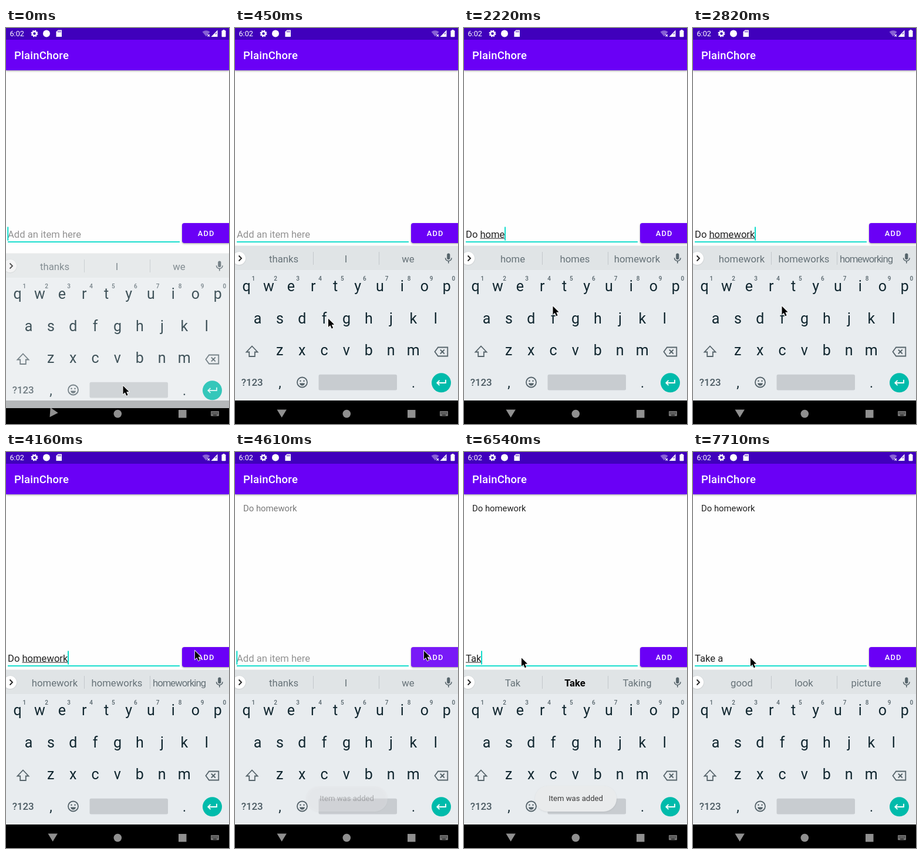
Write an HTML page with a canvas that moves like this. It is 380x674 px and loops after 8 s.

```html
<!DOCTYPE html>
<html lang="en">
<head>
<meta charset="utf-8">
<title>To-do list</title>
<style>
  html, body { margin: 0; width: 100%; height: 100%; overflow: hidden; background: #fefefe; }
  canvas { display: block; width: 380px; height: 674px; }
</style>
</head>
<body>
<canvas id="stage"></canvas>
<script>
const W = 380, H = 674, LOOP = 8000, TICK = LOOP / 54;
const canvas = document.getElementById('stage');
const ctx = canvas.getContext('2d');
const dpr = window.devicePixelRatio || 1;
canvas.width = W * dpr;
canvas.height = H * dpr;

const PURPLE = '#6a00f6', TEAL = '#03dac9', INK = '#212121';
const KEY_INK = '#10262f', KEY_GREY = '#56646b', NAV_GREY = '#909090';

// tick, field text, start of the underlined part (-1: none), suggestions (* = bold)
const TYPING = [
  [0, '', -1, 'thanks I we'],
  [8, 'D', 0, 'D Do Did'],
  [9, 'Do', 0, 'Do Does Dog'],
  [10, 'Do ', -1, 'a you have'],
  [12, 'Do h', 3, 'h have he'],
  [13, 'Do ho', 3, 'ho how hope'],
  [14, 'Do hom', 3, 'hom *home homes'],
  [15, 'Do home', 3, 'home homes homework'],
  [16, 'Do homew', 3, 'homew *homework homeward'],
  [17, 'Do homewo', 3, 'homewo *homework homeworks'],
  [18, 'Do homewor', 3, 'homewor *homework homeworks'],
  [19, 'Do homework', 3, 'homework homeworks homeworking'],
  [30, '', -1, 'thanks I we'],
  [40, 'T', 0, 'T The Thank'],
  [42, 'Ta', 0, 'Ta Take Taken'],
  [44, 'Tak', 0, 'Tak *Take Taking'],
  [45, 'Take', 0, 'Take Taken Takes'],
  [46, 'Take ', -1, 'a the care'],
  [48, 'Take a', 5, 'a at and'],
  [49, 'Take a ', -1, 'good look picture']
];
const CARET_OFF = [[3, 6], [23, 26], [33, 36], [52, 54]];
// start tick, end tick, from, to
const POINTER_MOVES = [
  [0, 4, [199, 608.5], [151, 473]],
  [22, 28, [151, 473], [321.5, 338]],
  [31, 36, [321.5, 338], [97.5, 350]]
];

const clamp = v => Math.max(0, Math.min(1, v));
const smooth = v => v * v * (3 - 2 * v);
const mix = (a, b, p) => a + (b - a) * p;

function text(str, x, y, size, color, { weight = 400, align = 'left', spacing = 0 } = {}) {
  ctx.font = `${weight} ${size}px Roboto, sans-serif`;
  ctx.letterSpacing = spacing + 'px';
  ctx.textAlign = align;
  ctx.fillStyle = color;
  ctx.fillText(str, x, y);
  ctx.letterSpacing = '0px';
}

function rect(x, y, w, h, color) {
  ctx.fillStyle = color;
  ctx.fillRect(x, y, w, h);
}

function round(x, y, w, h, r, color) {
  ctx.beginPath();
  ctx.roundRect(x, y, w, h, r);
  ctx.fillStyle = color;
  ctx.fill();
}

function disc(x, y, r, color) {
  ctx.beginPath();
  ctx.arc(x, y, r, 0, 7);
  ctx.fillStyle = color;
  ctx.fill();
}

function path(points, close) {
  ctx.beginPath();
  points.forEach(([x, y]) => ctx.lineTo(x, y));
  if (close) ctx.closePath();
}

function line(points, color, width, close) {
  path(points, close);
  ctx.strokeStyle = color;
  ctx.lineWidth = width;
  ctx.stroke();
}

function shape(points, color) {
  path(points, true);
  ctx.fillStyle = color;
  ctx.fill();
}

function withShadow(color, blur, dy, draw) {
  ctx.save();
  ctx.shadowColor = color;
  ctx.shadowBlur = blur * dpr;
  ctx.shadowOffsetY = dy * dpr;
  draw();
  ctx.restore();
}

function ring(x, y, r, color, width, dash = []) {
  ctx.beginPath();
  ctx.arc(x, y, r, 0, Math.PI * 2);
  ctx.setLineDash(dash);
  ctx.strokeStyle = color;
  ctx.lineWidth = width;
  ctx.stroke();
  ctx.setLineDash([]);
}

function drawBars() {
  withShadow('rgba(0,0,0,.4)', 3, 1, () => rect(0, 20, W, 52, PURPLE));
  rect(0, 0, W, 20, '#4000bc');
  text('6:02', 6.5, 14, 12.6, '#fff');
  // gear
  ring(48.5, 9.5, 3.5, '#fff', 2.6);
  ring(48.5, 9.5, 5.2, '#fff', 1.6, [2.2, Math.PI * 10.4 / 8 - 2.2]);
  disc(69, 9.5, 6, '#fff');
  // memory card
  shape([[88.5, 3.5], [95, 3.5], [95, 15], [85.5, 15], [85.5, 6.5]], '#fff');
  [88.3, 90.4, 92.5].forEach(x => rect(x, 5, 1, 2.5, '#4000bc'));
  // wifi, signal, battery
  ctx.beginPath();
  ctx.moveTo(341, 14.5);
  ctx.lineTo(334.5, 6.5);
  ctx.quadraticCurveTo(341, 1.8, 347.5, 6.5);
  ctx.fillStyle = 'rgba(255,255,255,.38)';
  ctx.fill();
  line([[343.5, 11], [347, 14.5]], '#fff', 1.1);
  line([[347, 11], [343.5, 14.5]], '#fff', 1.1);
  shape([[360.5, 3.5], [360.5, 15], [349.5, 15]], '#fff');
  shape([[359, 7], [359, 10.5], [355.5, 10.5]], '#8c66d7');
  round(367.5, 4.2, 7, 11, 1, '#fff');
  rect(369.5, 3, 3, 2, '#fff');
  text('PlainChore', 14, 53.3, 18.5, '#fff', { weight: 500, spacing: 0.23 });
}

function drawField(tick, value, compose) {
  const x = 3, base = 356.5, size = 16.6;
  if (value) text(value, x, base, size, INK);
  else text('Add an item here', x, base, size, '#929292');
  ctx.font = `${size}px Roboto, sans-serif`;
  const end = ctx.measureText(value).width;
  if (compose >= 0) {
    const start = ctx.measureText(value.slice(0, compose)).width;
    rect(x + start, 357.6, end - start, 1, INK);
  }
  rect(3, 363.2, 293, 1.8, TEAL);
  if (!CARET_OFF.some(([a, b]) => tick >= a && tick < b)) {
    rect(value ? x + end - 0.3 : 2.3, 338.5, 1.9, 23.3, TEAL);
  }
}

function drawButton(tick) {
  withShadow('rgba(0,0,0,.35)', 3, 1.2, () => round(300, 332, 84, 34, 4, PURPLE));
  const press = { 29: 0.12, 30: 0.22, 31: 0.1 }[tick];
  if (press) round(300, 332, 84, 34, 4, `rgba(255,255,255,${press})`);
  text('ADD', 326.7, 354.2, 12.9, '#fff', { weight: 500, spacing: 1.15 });
}

function drawNav(tick) {
  rect(0, 634, W, 40, '#000');
  const turn = [1, 0.2][tick] || 0;
  ctx.save();
  ctx.translate(79.7 + 2 * turn, 656 - 1.4 * turn);
  ctx.rotate(-1.5 * turn);
  shape([[-8.2, -6.6], [8.2, -6.6], [0, 7]], NAV_GREY);
  ctx.restore();
  disc(190.3, 656.6, 6.8, NAV_GREY);
  rect(294, 650, 13.5, 13.5, NAV_GREY);
  round(349, 652, 14, 8.5, 1, '#7c7c7c');
  for (let i = 0; i < 5; i++) {
    rect(350.5 + i * 2.4, 653.6, 1.2, 1.2, '#000');
    rect(350.5 + i * 2.4, 656, 1.2, 1.2, '#000');
  }
  rect(353, 658.4, 6, 1, '#000');
}

function drawSuggestions(words) {
  rect(0, 371, W, 41.5, '#e0e4e6');
  withShadow('rgba(0,0,0,.15)', 2, 0.5, () => disc(7, 392, 11, '#fff'));
  line([[6.5, 387.5], [11, 392], [6.5, 396.5]], '#222', 1.8);
  rect(133, 381, 1, 22, '#c3c8cb');
  rect(245, 381, 1, 22, '#c3c8cb');
  words.split(' ').forEach((word, i) => {
    const bold = word[0] === '*';
    // long words are set tighter
    const spacing = word.length > 10 ? -1 : 0;
    text(word.replace('*', ''), 83 + i * 106, 398.6, 16.7, bold ? '#000' : '#667278',
      { weight: bold ? 700 : 400, align: 'center', spacing });
  });
  // microphone
  round(361.2, 383.5, 5.2, 10.5, 2.6, KEY_GREY);
  ctx.beginPath();
  ctx.arc(363.8, 391.3, 5.3, 0, Math.PI);
  ctx.strokeStyle = KEY_GREY;
  ctx.lineWidth = 1.5;
  ctx.stroke();
  rect(363, 396.5, 1.6, 4, KEY_GREY);
}

function keyRow(letters, x, y) {
  [...letters].forEach((c, i) => text(c, x + i * 37.9, y, 25, KEY_INK, { align: 'center' }));
}

function drawKeys() {
  rect(0, 412.5, W, 221.5, '#e8ecef');
  keyRow('qwertyuiop', 19.6, 448);
  keyRow('asdfghjkl', 38.5, 502.6);
  keyRow('zxcvbnm', 76.2, 557.2);
  [...'1234567890'].forEach((d, i) =>
    text(d, 31.3 + i * 37.9, 429.6, 10, KEY_GREY, { weight: 500, align: 'center' }));

  line([[29, 541.5], [38.5, 551.5], [33.8, 551.5], [33.8, 559], [24.2, 559], [24.2, 551.5], [19.5, 551.5]],
    KEY_GREY, 1.8, true);
  line([[340.5, 551], [346, 543.5], [362.3, 543.5], [362.3, 558.5], [346, 558.5]], KEY_GREY, 1.8, true);
  line([[349.8, 547.5], [356.8, 554.5]], KEY_GREY, 1.8);
  line([[356.8, 547.5], [349.8, 554.5]], KEY_GREY, 1.8);

  text('?123', 29.2, 609, 16.9, '#4b5a62', { weight: 500, align: 'center' });
  text(',', 76.5, 612, 23, KEY_INK, { align: 'center' });
  text('.', 304, 612, 23, KEY_INK, { align: 'center' });
  ring(114.5, 603, 8.5, KEY_GREY, 1.8);
  disc(111.5, 600.7, 1.3, KEY_GREY);
  disc(117.5, 600.7, 1.3, KEY_GREY);
  ctx.beginPath();
  ctx.arc(114.5, 604.4, 4.4, 0, Math.PI);
  ctx.fill();
  round(142.5, 589.7, 133.5, 26.8, 2.5, '#c8ccd0');

  disc(351.5, 603.8, 16.5, '#00bbab');
  line([[359, 598.8], [359, 604], [344.5, 604]], '#fff', 1.9);
  line([[348.5, 599.8], [344.3, 604], [348.5, 608.2]], '#fff', 1.9);
}

function drawKeyboard(tick, words) {
  ctx.save();
  if (tick === 0) ctx.globalAlpha = 0.78;
  ctx.translate(0, [13, 2][tick] || 0);
  // an opaque layer is faded as a whole by clipping each part to its own area
  rect(0, 370, W, 1, 'rgba(0,0,0,.06)');
  drawSuggestions(words);
  drawKeys();
  ctx.restore();
}

function drawToast(tick) {
  const alpha = tick < 40 ? clamp((tick - 30) / 3) : clamp((47 - tick) / 3);
  if (!alpha) return;
  ctx.save();
  ctx.globalAlpha = alpha;
  withShadow('rgba(0,0,0,.08)', 3, 1, () => round(121, 568, 139, 44, 22, '#e9ebec'));
  text('Item was added', 190.5, 594.4, 13.1, '#3a3a3a', { align: 'center' });
  ctx.restore();
}

function drawPointer(tick) {
  const move = POINTER_MOVES.filter(m => tick >= m[0]).pop();
  const [start, end, from, to] = move;
  const p = smooth(clamp((tick - start) / (end - start)));
  ctx.save();
  ctx.translate(mix(from[0], to[0], p), mix(from[1], to[1], p));
  const arrow = [[0.5, 0.5], [0.5, 14.8], [3.8, 11.8], [6.2, 17.3], [8.6, 16.3], [6.2, 10.8], [10.6, 10.6]];
  line(arrow, '#fff', 1.6, true);
  shape(arrow, '#000');
  ctx.restore();
}

function draw(time) {
  const tick = Math.min(53, Math.floor((time % LOOP + 5) / TICK));
  const [, value, compose, words] = TYPING.filter(s => tick >= s[0]).pop();
  ctx.setTransform(dpr, 0, 0, dpr, 0, 0);
  rect(0, 0, W, H, '#fefefe');
  drawBars();
  if (tick >= 31) {
    ctx.globalAlpha = tick === 31 ? 0.6 : 1;
    text('Do homework', 14, 100.8, 14.85, INK);
    ctx.globalAlpha = 1;
  }
  drawField(tick, value, compose);
  drawButton(tick);
  drawNav(tick);
  drawKeyboard(tick, words);
  drawToast(tick);
  drawPointer(tick);
}

const begin = performance.now();
function loop() {
  draw(performance.now() - begin);
  requestAnimationFrame(loop);
}
loop();
</script>
</body>
</html>
```
